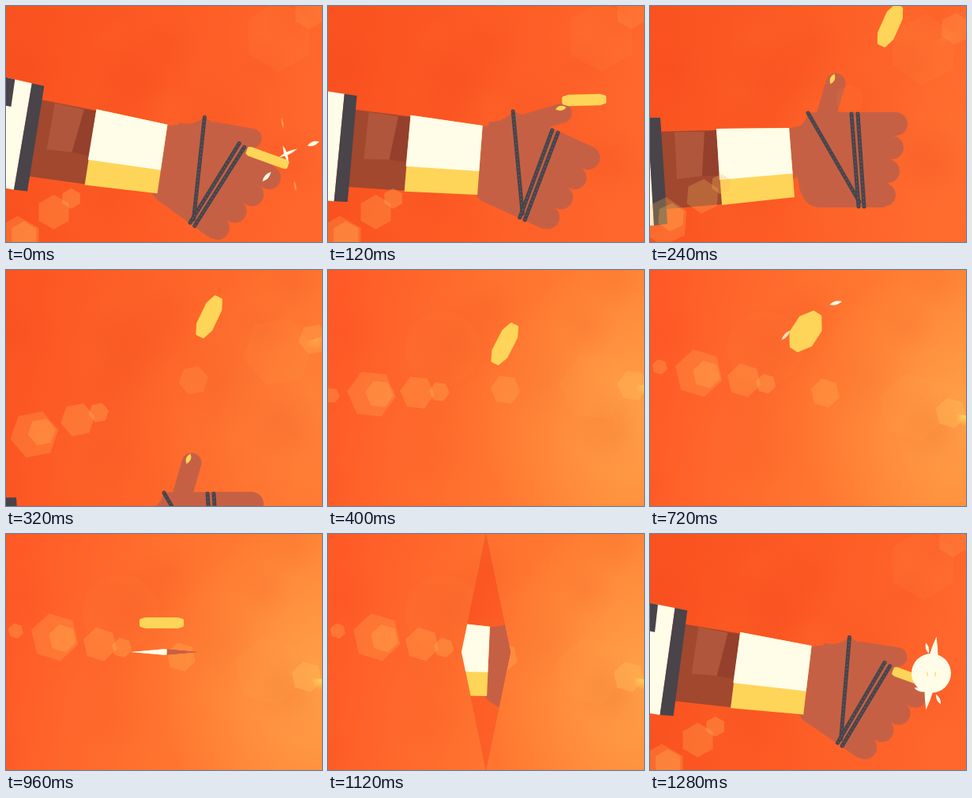
Recreate the animation shown at these times as an HTML page with a canvas. Size 400 by 300 pixels, loop 1360 ms.

```html
<!DOCTYPE html>
<html lang="en">
<head>
<meta charset="utf-8">
<title>Coin flip</title>
<style>
html, body { margin: 0; width: 100%; height: 100%; overflow: hidden; background: #fb5822; }
canvas { display: block; width: 100vw; height: 100vh; }
</style>
</head>
<body>
<canvas id="stage" width="400" height="300"></canvas>
<script>
const c = document.getElementById('stage').getContext('2d');
const RAD = Math.PI / 180, LOOP = 1360, STEP = 40;
const CREAM = '#fffce8', GOLD = '#fed558', DARK = '#48444a', SKIN = '#c66044', ARM = '#a1482f';

// Arm x, y, turn; hand x, y, turn; thumb angle.
const REST = [152.5, 187, 12.9, 235, 278, 36, -26];
const LIFTED = [157, 159, 7, 251, 241, 31, -26];
const THUMB_UP = [133.5, 201.8, 0, 267, 256, 0, -74];

const ramp = (t, from, to) => Math.min(1, Math.max(0, (t - from) / (to - from)));
const smooth = (t, from, to) => {
  const f = ramp(t, from, to);
  return f * f * (3 - 2 * f);
};
const mix = (a, b, f) => a.map((v, i) => v + (b[i] - v) * f);
const isCatch = t => t > 900;

function placed(x, y, turn, draw) {
  c.save();
  c.translate(x, y);
  c.rotate(turn * RAD);
  draw();
  c.restore();
}

function poly(color, ...p) {
  c.beginPath();
  for (let i = 0; i < p.length; i += 2) c.lineTo(p[i], p[i + 1]);
  c.closePath();
  c.fillStyle = color;
  c.fill();
}

function disc(color, x, y, r) {
  c.beginPath();
  c.arc(x, y, r, 0, 7);
  c.fillStyle = color;
  c.fill();
}

function line(color, width, x1, y1, x2, y2) {
  c.beginPath();
  c.moveTo(x1, y1);
  c.lineTo(x2, y2);
  c.strokeStyle = color;
  c.lineWidth = width;
  c.lineCap = 'round';
  c.stroke();
}

function petal(x, y, length, width, turn, color = CREAM) {
  placed(x, y, turn, () => {
    c.beginPath();
    c.moveTo(-length, 0);
    c.quadraticCurveTo(0, -width * 2, length, 0);
    c.quadraticCurveTo(0, width * 2, -length, 0);
    c.fillStyle = color;
    c.fill();
  });
}

function wash(...colors) {
  const g = c.createLinearGradient(0, 0, 400, 60);
  colors.forEach((color, i) => g.addColorStop(i / (colors.length - 1), color));
  c.fillStyle = g;
  c.fillRect(0, 0, 400, 300);
}

function glow(x, y, r, rgb, alpha) {
  const g = c.createRadialGradient(x, y, 0, x, y, r);
  g.addColorStop(0, `rgba(${rgb},${alpha})`);
  g.addColorStop(1, `rgba(${rgb},0)`);
  c.fillStyle = g;
  c.fillRect(0, 0, 400, 300);
}

function backdrop(light) {
  wash('#f9511f', '#fd5a24', '#ff672c');
  c.globalAlpha = light;
  wash('#ff5826', '#ff702e', '#ff8436');
  glow(400, 190, 210, '255,180,84', .6);
  c.globalAlpha = 1;
  let seed = 7;
  const random = () => (seed = seed * 16807 % 2147483647) / 2147483647;
  for (let i = 0; i < 24; i++) {
    glow(random() * 400, random() * 300, 20 + random() * 50, i % 2 ? '255,125,55' : '225,50,20', .08);
  }
}

// A chain of hexagons swings level around the centre and gathers towards it.
function flares(swing) {
  const apart = (1 - swing) ** 2;
  const hexagon = (near, r, alpha) => {
    const x = near + apart * (near < 0 ? -95 : 50), p = [];
    for (let a = 8; a < 360; a += 60) p.push(x + r * Math.cos(a * RAD), r * Math.sin(a * RAD));
    poly(`rgba(255,185,90,${alpha})`, ...p);
  };
  placed(200, 153, -38 + 47 * swing, () => {
    hexagon(-190, 10, .28);
    hexagon(-140, 31, .24);
    hexagon(-130, 18, .28);
    hexagon(-82, 22, .26);
    hexagon(-54, 13, .3);
    hexagon(22, 19, .26 * (1 - apart));
    hexagon(183, 20, .15 + .27 * swing);
    hexagon(135, 45, .06);
    glow(203, 0, 14, '255,225,90', .8 * swing);
  });
}

function drawHand(thumb) {
  const tipX = 222 + 47 * Math.cos(thumb * RAD), tipY = 143 + 47 * Math.sin(thumb * RAD);
  c.beginPath();
  c.moveTo(178, 160);
  c.quadraticCurveTo(194, 155, 200, 136);
  c.lineTo(208, 135);
  c.lineTo(312, 135);
  c.lineTo(297, 256);
  c.lineTo(212, 256);
  c.quadraticCurveTo(192, 253, 188, 225);
  c.fillStyle = SKIN;
  c.fill();
  for (let i = 0; i < 4; i++) line(SKIN, 30, 255, 150 + i * 30, 311 - i * 5, 150 + i * 30);
  line(SKIN, 25, 222, 143, tipX, tipY);
  if (thumb < -40) petal(tipX - 4, tipY - 5, 7, 3, thumb + 6, GOLD);
  const rope = (...ends) => {
    line(DARK, 5, ...ends);
    c.setLineDash([.1, 5]);
    line('#6b6468', 1.5, ...ends);
    c.setLineDash([]);
  };
  rope(200, 136, 265, 249);
  rope(255, 137, 264, 255);
  rope(263, 137, 271, 255);
}

const lift = t => isCatch(t) ? 1 - .73 * smooth(t, 1120, 1280) : 0;

function drawArm(t) {
  const flick = isCatch(t) ? 0 : smooth(t, 60, 220);
  const drop = isCatch(t) ? 0 : .023 * Math.max(0, t - 240) ** 2;
  const [ax, ay, turn, hx, hy, handTurn, thumb] = mix(mix(REST, LIFTED, lift(t)), THUMB_UP, flick);
  placed(ax, ay + drop, turn, () => {
    c.translate(-133.5, -201.8);
    poly(ARM, 0, 160, 110, 157, 115, 250, 10, 259);
    poly('#b0563c', 31, 160, 69, 160, 66, 216, 34, 220);
    poly('#94402c', 69, 160, 85, 158, 90, 216, 66, 216);
    poly(SKIN, 176, 156, 204, 148, 215, 200, 181, 220);
    c.translate(133.5, 201.8);
  });
  placed(hx, hy + drop, handTurn, () => {
    c.translate(-267, -256);
    drawHand(thumb);
  });
  placed(ax, ay + drop, turn, () => {
    c.translate(-133.5, -201.8);
    poly(GOLD, 84, 156, 176, 155, 183, 243, 91, 253);
    poly(CREAM, 84, 156, 176, 155, 180.5, 213, 88, 221);
    poly(CREAM, -70, 142, -3, 142, 5, 279, -70, 283);
    poly(DARK, -3, 142, 13, 142, 22, 277, 5, 279);
    poly(DARK, -70, 142, -25, 142, -22, 177, -70, 177);
  });
}

function drawCoin(t) {
  const toss = isCatch(t) && t > 1100 ? 1 - ramp(t, 1120, 1250) : ramp(t, 80, 240);
  const inAir = t < 1100;
  const drift = inAir ? 1 - (1 - ramp(t, 240, 560)) ** 2 : 0;
  const fall = inAir ? Math.max(0, (t - 720) / 240) : 0;
  const x = 331 + 10 * lift(t) * !inAir - 27 * toss - 107 * drift;
  const rise = 193 - 36 * lift(t) * !inAir - 168 * (1 - (1 - toss) ** 2);
  const y = inAir ? rise + 69 * ramp(t, 240, 400) - 16 * ramp(t, 400, 720) + 35 * fall ** 2 : rise;
  const tilt = 20 - 86 * toss + (inAir ? 9 * ramp(t, 240, 720) + 57 * Math.min(1, fall) : 0);
  const w = 4 + 5 * toss + (inAir ? 6 * ramp(t, 400, 720) - 10 * Math.min(1, fall) : 0);
  const l = 26, end = .15 + 2.6 / w, m = l * (end + .1);
  placed(x, y, tilt, () => {
    poly(GOLD, -l, -w * end, -m, -w, m, -w, l, -w * end, l, w * end, m, w, -m, w, -l, w * end);
    c.strokeStyle = GOLD;
    c.lineWidth = 4;
    c.lineJoin = 'round';
    c.stroke();
  });
}

function flash(size) {
  placed(356, 177, 0, () => {
    c.scale(size, size);
    disc(CREAM, 0, 0, 25);
    petal(0, 0, 47, 7, -82);
    petal(-5, -32, 7, 2, 75);
    petal(9, 33, 7, 2, 65);
    petal(-15, 21, 7, 2, 20);
    petal(-5, 1, 4, .8, 80, GOLD);
    petal(5, 1, 4, .8, 100, GOLD);
  });
}

function sparks(t) {
  const d = t / 40, fade = 1 - t / 120;
  c.globalAlpha = fade;
  petal(357, 187, 13 * fade, 2, -25);
  petal(354, 188, 11 * fade, 2, 72);
  petal(389 + d * 8, 175 - d * 4, 8, 2.5, -20);
  petal(330 - d * 8, 217 + d * 9, 8, 2.5, -48);
  petal(350 - d, 149 - d * 9, 7, 1.2, 80, '#ff9a4c');
  petal(366 + d * 2, 229 + d * 9, 7, 1.2, 80, '#ff9a4c');
  c.globalAlpha = 1;
}

function glints(t) {
  const d = (t - 720) / 40;
  petal(235 + d * 6, 42 - d * 3, 8, 2.2, -15);
  petal(172 - d * 4, 83 + d * 4, 8, 2.2, -48, '#ffdfb4');
}

function handScene(t) {
  const swing = isCatch(t) ? 0 : smooth(t, 180, 500);
  backdrop(swing);
  if (t > 1140) drawCoin(t);
  drawArm(t);
  flares(swing);
  if (t < 900 || t > 1140) drawCoin(t);
}

function skyScene(t) {
  backdrop(1);
  disc('rgba(255,150,70,.06)', 145, 100, 48);
  flares(smooth(t, 180, 500));
  if (t < 1080) drawCoin(t);
  if (t >= 640 && t <= 800) glints(t);
}

// The next scene opens through a diamond that grows tall, then wide.
function iris(t) {
  const open = ramp(t, 920, 1120), burst = ramp(t, 1120, 1200);
  const w = 45 - 14 * open + 670 * burst, h = 150 * open ** 2.3 + 550 * burst;
  c.save();
  c.beginPath();
  poly(SKIN, 200 - w, 150, 200, 150 - h, 200 + w, 150, 200, 150 + h);
  c.clip();
  handScene(t);
  c.restore();
}

function draw(t) {
  if (t < 400) handScene(t);
  else skyScene(t);
  if (t > 920) iris(t);
  if (t < 120) sparks(t);
  if (t >= 1240) flash(ramp(t, 1200, 1280));
}

function tick() {
  const t = Math.floor(performance.now() % LOOP / STEP) * STEP;
  draw(Math.min(t, 1280));
  requestAnimationFrame(tick);
}
tick();
</script>
</body>
</html>
```
